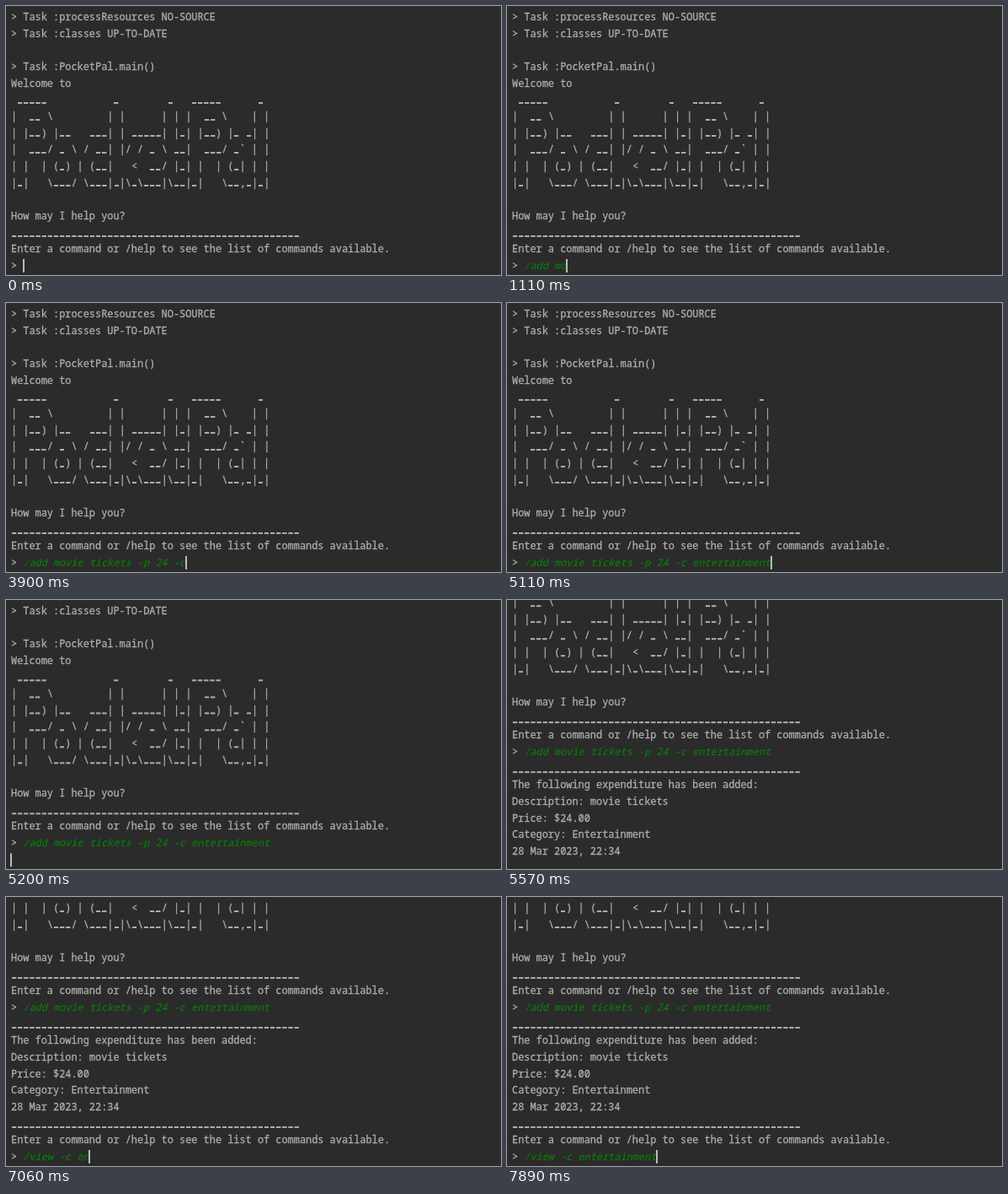
Animation of 588x319 px, one loop 7.99 s. Source, as an HTML page:

```html
<!DOCTYPE html>
<html lang="en">
<head>
<meta charset="utf-8">
<title>Console session</title>
<style>
  html, body { margin: 0; width: 100%; height: 100%; overflow: hidden; background: #2b2b2b; }
  #stage { position: relative; width: 588px; height: 319px; overflow: hidden; }
  #log { position: absolute; inset: 0; }
  .row {
    position: absolute; left: 6px; height: 19.67px; line-height: 19.67px;
    white-space: pre; color: #aeaeae; -webkit-text-stroke: 0.3px;
    font-family: "Noto Sans Mono", "DejaVu Sans Mono", monospace;
    font-size: 11.92px; font-variant-ligatures: none;
  }
  /* underscores drawn as separate dashes, one per cell */
  .dash {
    color: transparent;
    background: linear-gradient(90deg, transparent 8%, #aeaeae 8% 92%, transparent 92%) 0 11.8px / 7.152px 1.5px repeat-x;
  }
  .typed { color: #0a7f0a; font-style: italic; -webkit-text-stroke: 0.15px; }
  #caret { position: absolute; width: 2px; height: 16px; background: #bbb; }
</style>
</head>
<body>
<div id="stage"><div id="log"><div id="caret"></div></div></div>
<script>
const LOOP = 7990, PITCH = 19.67, CELL = 7.152, TOP = 3;
const KEY_MS = 62;    // time per key within a burst
const BLINK_MS = 500; // caret goes dark this long after the last key
const RULE = "_".repeat(48);
const ASK = "Enter a command or /help to see the list of commands available.";

const lines = String.raw`> Task :processResources NO-SOURCE
> Task :classes UP-TO-DATE

> Task :PocketPal.main()
Welcome to
 _____           _        _   _____      _
|  __ \         | |      | | |  __ \    | |
| |__) |__   ___| | _____| |_| |__) |_ _| |
|  ___/ _ \ / __| |/ / _ \ __|  ___/ _${"`"} | |
| |  | (_) | (__|   <  __/ |_| |  | (_| | |
|_|   \___/ \___|_|\_\___|\__|_|   \__,_|_|

How may I help you?
${RULE}
${ASK}
> 
${RULE}
The following expenditure has been added:
Description: movie tickets
Price: $24.00
Category: Entertainment
28 Mar 2023, 22:34
${RULE}
${ASK}
> `.split("\n");

// Each command is typed in bursts: start time and the keys that follow.
const inputs = [
  { row: 15, bursts: [
    [280, "/"], [650, "add "], [1020, "movie tickets "], [2510, "-"], [2970, "p"],
    [3160, " 24 -"], [3900, "c "], [4180, "ent"], [4460, "er"], [4640, "tain"], [4920, "ment"]] },
  { row: 24, bursts: [[5940, "/"], [6310, "vi"], [6500, "ew"], [6690, " -c entert"], [7510, "ainment"]] }
];

const views = [
  { at: 0, scroll: 0, rows: 16, caret: 15 },
  { at: 5200, scroll: PITCH, rows: 16, caret: 16 },
  { at: 5570, scroll: 6.5 * PITCH, rows: 25, caret: 24 },
  { at: 5660, scroll: 9 * PITCH, rows: 25, caret: 24 }
];

const log = document.getElementById("log");
const caret = document.getElementById("caret");
const rowTop = i => TOP + i * PITCH;

function addSpan(parent, className, text = "") {
  const span = document.createElement("span");
  span.className = className;
  span.textContent = text;
  parent.append(span);
  return span;
}

const rows = lines.map((text, i) => {
  const el = document.createElement("div");
  el.className = "row";
  el.style.top = rowTop(i) + "px";
  for (const part of text.split(/(_+)/)) {
    if (part.startsWith("_")) addSpan(el, "dash", part);
    else el.append(part);
  }
  log.insertBefore(el, caret);
  return el;
});

for (const input of inputs) input.el = addSpan(rows[input.row], "typed");

const typedAt = (bursts, t) => bursts
  .map(([at, keys]) => keys.slice(0, Math.max(0, Math.floor((t - at) / KEY_MS) + 1)))
  .join("");

// Dark for the gap before the first key and once in the long pause after "tickets".
function caretLit(t) {
  const pauseEnd = 2510, pauseStart = pauseEnd - 600 + BLINK_MS;
  return !(t >= 90 && t < 280) && !(t >= pauseStart && t < pauseEnd);
}

function draw(t) {
  const view = views.filter(v => t >= v.at).pop();
  let col = 0;
  for (const { row, bursts, el } of inputs) {
    const text = typedAt(bursts, t);
    el.textContent = text;
    if (row === view.caret) col = 2 + text.length;
  }
  rows.forEach((el, i) => { el.style.visibility = i < view.rows ? "visible" : "hidden"; });
  log.style.transform = `translateY(${-view.scroll}px)`;
  caret.style.left = Math.round(5.2 + col * CELL) + "px";
  caret.style.top = rowTop(view.caret) + 2 + "px";
  caret.style.visibility = caretLit(t) ? "visible" : "hidden";
}

const start = performance.now();
function tick() {
  draw((performance.now() - start) % LOOP);
  requestAnimationFrame(tick);
}
tick();
</script>
</body>
</html>
```
